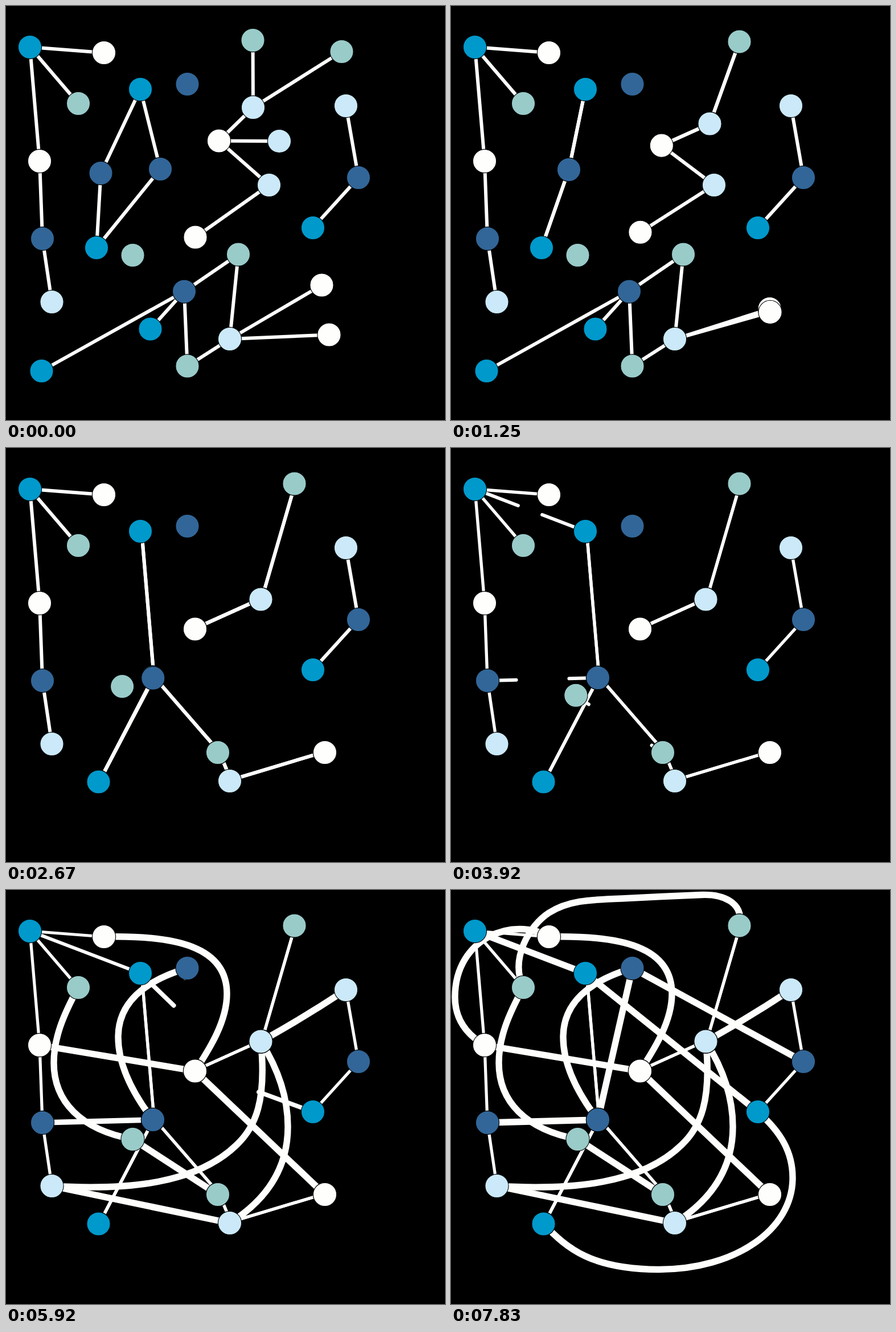
These frames come from a looping animation (771 by 726 pixels, 8000 ms). An HTML page:

```html
<!DOCTYPE html>
<html lang="en">
<head>
<meta charset="utf-8">
<title>Merging network</title>
<style>
html, body { margin: 0; width: 100%; height: 100%; overflow: hidden; background: #000; }
svg { display: block; width: 100vw; height: 100vh; }
.lines { fill: none; stroke: #fefefc; stroke-linecap: round; }
circle { stroke: #000; stroke-width: 1.1; }
</style>
</head>
<body>
<svg id="stage" viewBox="0 0 771 726"></svg>
<script>
const LOOP = 8000, STEP = 1000 / 12;
const MOVE = 600, DRAW = 635, SWELL = 700;
const START = 6, THIN = 5.2, THICK = 11.4;
const COLORS = { b: '#0099cb', d: '#326698', t: '#99cbc9', l: '#cbe9f9', w: '#fefefc' };

const nodes = [
  'b 42 72', 'w 172 82', 't 127 171', 'w 59 272', 'd 64 408', 'l 80.5 519',
  'b 236 146', 'd 318.5 137', 'd 166.5 293', 'd 271 286', 'b 159 424', 't 222.5 437',
  't 433.5 60', 't 589.5 80', 'l 434 178', 'l 480 237', 'w 374 236.5', 'l 462 314',
  'w 332.5 405.5', 'l 597 175', 'd 619 301', 'b 539 389', 't 408 435.5', 'd 313 500.5',
  'b 253.5 566.5', 'b 62.5 640', 't 318.5 631.5', 'l 393 584', 'w 554.5 489.5', 'w 567.5 576.5'
].map(s => {
  const [c, x, y] = s.split(' ');
  return { color: COLORS[c], x: +x, y: +y };
});

// Each wave sends groups of nodes to a meeting point, one group per gap
const moves = [
  { at: 0, gap: 230, go: ['506.5 62.5: 12 13', '207 287: 8 9', '454.5 206.5: 14 15', '560 534: 28 29'] },
  { at: 1190, gap: 110, go: ['332 317.5: 16 18', '162.5 585.5: 24 25', '447.5 265.5: 14 15 17', '162.5 585.5: 10'] },
  { at: 1920, gap: 150, go: ['372 534: 22 26', '258 403: 8 9 23'] },
  { at: 2070, gap: 0, go: ['204 418: 11'] },
  { at: 3420, gap: 0, go: ['222.5 437: 11'] }
].flatMap(({ at, gap, go }) => go.map((s, i) => {
  const [to, ids] = s.split(': ').map(part => part.split(' ').map(Number));
  return { at: at + i * gap, x: to[0], y: to[1], ids };
}));
const movers = new Set(moves.flatMap(m => m.ids));

const edges = ('0-1 0-2 0-3 3-4 4-5 6-8 6-9 8-10 9-10 12-14 13-14 14-16 15-16 16-17 17-18 ' +
  '19-20 20-21 22-23 23-24 23-25 23-26 22-27 26-27 27-28 27-29')
  .split(' ').map(s => s.split('-').map(Number));

const ramp = (t, at, span) => Math.min(1, Math.max(0, (t - at) / span));
const mix = (a, b, p) => a + (b - a) * p;
const quad = (a, c, b, u) => mix(mix(a, c, u), mix(c, b, u), u);

function place(t) {
  const pos = nodes.map(({ x, y }) => ({ x, y }));
  for (const { at, x, y, ids } of moves) {
    const p = ramp(t, at, MOVE);
    for (const i of ids) pos[i] = { x: mix(pos[i].x, x, p), y: mix(pos[i].y, y, p) };
  }
  return pos;
}
const home = place(LOOP);

// New links: two nodes and, for a curve, the handles between them
const links = [
  { at: 3420, gap: 166, swell: i => 4350 + 70 * (5 - i) ** 2,
    join: ['0-6', '4-8', '11-22', '14-19 490 242 550 206', '3-16', '16-29'] },
  { at: 4750, gap: 70, join: [
    '2-11 100 220 84 260 84 303 84 370 130 420',
    '5-27',
    '14-27 482 320 495 370 495 415 495 490 455 545',
    '7-8 240 160 197 200 197 258 197 310 225 360',
    '14-5 458 370 438 416 405 447 335 515 215 527',
    '1-16 300 79 388 100 388 182 388 230 358 278'] },
  { at: 5600, gap: 230, join: [
    '6-21 bend',
    '7-8',
    '24-21 205 630 248 665 365 665.5 500 665.5 600 595 600 505 600 460 580 425',
    '7-20',
    '1-3 112 46 7 82 7 188 7 225 25 252',
    '2-12 103 120 138 62 172 40 205 19 240 17 300 15 350 12.5 390 10.5 440 8.5 475 7 515 20'] }
].flatMap(({ at, gap, swell, join }) => join.map((s, i) => {
  const [ends, ...via] = s.split(' ');
  const [a, b] = ends.split('-').map(n => home[n]);
  const start = at + i * gap;
  const curve = via.length > 1 ? 'C' + via.join(' ') + ' ' : 'L';
  return {
    a, b, start,
    swell: swell ? swell(i) : start + 100,
    bend: via[0] === 'bend',
    d: `M${a.x} ${a.y}${curve}${b.x} ${b.y}`
  };
}));

const stage = document.getElementById('stage');
function set(el, attrs) {
  for (const k in attrs) el.setAttribute(k, attrs[k]);
}
function add(parent, tag, attrs = {}) {
  const el = document.createElementNS('http://www.w3.org/2000/svg', tag);
  set(el, attrs);
  return parent.appendChild(el);
}

const lines = add(stage, 'g', { class: 'lines' });
const edgeEls = edges.map(() => add(lines, 'line'));
const linkEls = links.map(l => add(lines, 'path', { d: l.d, pathLength: 1 }));
const dots = nodes.map(n => add(stage, 'circle', { r: 20.6, fill: n.color }));

// Edges of merged nodes end up a little off centre
function drawEdges(t, pos) {
  const width = mix(START, THIN, ramp(t, 3420, MOVE));
  const drift = 2 * ramp(t, 2070, MOVE);
  edges.forEach(([a, b], i) => {
    const off = movers.has(a) || movers.has(b) ? drift : 0;
    set(edgeEls[i], {
      x1: pos[a].x + off, y1: pos[a].y - off,
      x2: pos[b].x + off, y2: pos[b].y - off,
      'stroke-width': width
    });
  });
}

// Two tips on bowed paths that meet between the nodes
function bentTips({ a, b }, p) {
  const mx = mix(a.x, b.x, 0.54), my = mix(a.y, b.y, 0.54);
  const tip = (n, cx, cy) =>
    `M${n.x} ${n.y}L${quad(n.x, cx, mx, p)} ${quad(n.y, cy, my, p)}`;
  return tip(a, 272, 194) + tip(b, 418, 375);
}

function drawLinks(t) {
  links.forEach((l, i) => {
    const p = ramp(t, l.start, DRAW);
    const partial = p < 1 && !l.bend;
    set(linkEls[i], {
      visibility: p > 0 ? 'visible' : 'hidden',
      'stroke-width': mix(START, THICK, ramp(t, l.swell, SWELL)),
      'stroke-dasharray': partial ? `${p / 2} ${1 - p} ${p / 2} 1` : 'none'
    });
    if (l.bend) set(linkEls[i], { d: bentTips(l, p) });
  });
}

function render(time) {
  const t = Math.floor((time % LOOP + 4) / STEP) * STEP % LOOP;
  const pos = place(t);
  drawEdges(t, pos);
  drawLinks(t);
  dots.forEach((el, i) => set(el, { cx: pos[i].x, cy: pos[i].y }));
}

const begin = performance.now();
function tick() {
  render(performance.now() - begin);
  requestAnimationFrame(tick);
}
tick();
</script>
</body>
</html>
```
